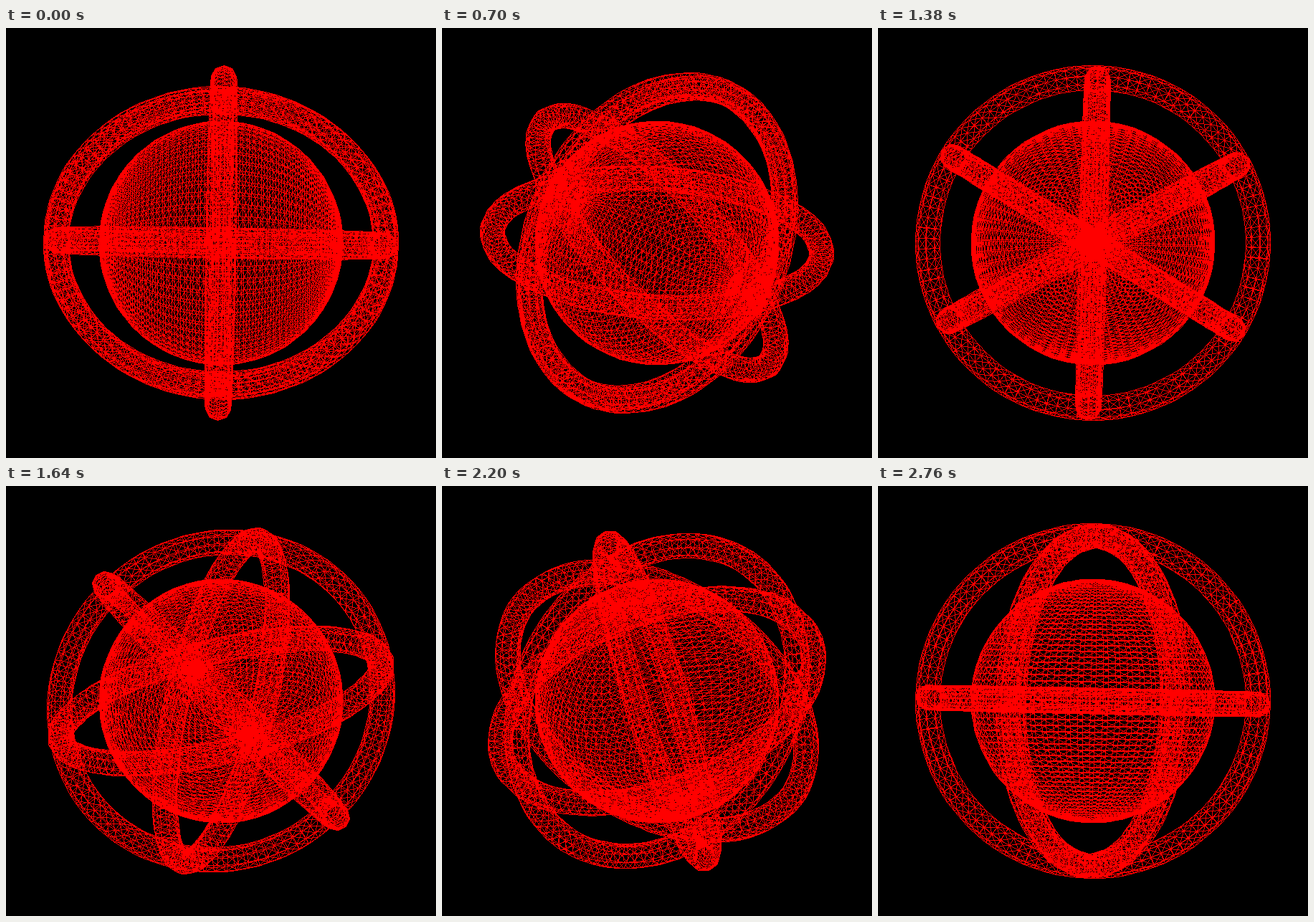
An HTML page with a canvas that plays this animation: 600 px wide and 600 px high, repeating every 2.78 s.

```html
<!DOCTYPE html>
<html lang="en">
<head>
<meta charset="utf-8">
<title>Wireframe sphere with rings</title>
<style>
  html, body { margin: 0; width: 100%; height: 100%; overflow: hidden; background: #000; }
  canvas { display: block; width: 600px; height: 600px; image-rendering: pixelated; }
</style>
</head>
<body>
<canvas id="stage" width="600" height="600"></canvas>
<script>
const SIZE = 600, CENTER = 300;
const FRAME_MS = 20, FRAMES = 139;
const SPHERE_RADIUS = 170, RING_RADIUS = 230, TUBE_RADIUS = 17.5;
const SPHERE_STEPS = 60, RING_STEPS = 100, TUBE_STEPS = 9;
const DEG = Math.PI / 180, TAU = 2 * Math.PI;
const RED = 0xff0000ff, BLACK = 0xff000000;

const ctx = document.getElementById('stage').getContext('2d');
const image = ctx.createImageData(SIZE, SIZE);
const pixels = new Uint32Array(image.data.buffer);

// A mesh is a (rows + 1) x (cols + 1) lattice of points.
function mesh(rows, cols, pointAt) {
  const points = [];
  for (let i = 0; i <= rows; i++)
    for (let j = 0; j <= cols; j++) points.push(pointAt(i / rows, j / cols));
  return { rows, cols, points, xs: new Int16Array(points.length), ys: new Int16Array(points.length) };
}

// The poles lie on the x axis.
const sphere = mesh(SPHERE_STEPS, SPHERE_STEPS, (u, v) => {
  const lat = u * Math.PI, lon = v * TAU, r = SPHERE_RADIUS * Math.sin(lat);
  return [SPHERE_RADIUS * Math.cos(lat), r * Math.cos(lon), r * Math.sin(lon)];
});

// orient maps (in-plane a, in-plane b, along the ring's axis) to body space.
function ring(orient) {
  return mesh(RING_STEPS, TUBE_STEPS, (u, v) => {
    const r = RING_RADIUS + TUBE_RADIUS * Math.cos(v * TAU);
    return orient(r * Math.cos(u * TAU), r * Math.sin(u * TAU), TUBE_RADIUS * Math.sin(v * TAU));
  });
}

function meridian(angle) {
  const c = Math.cos(angle * DEG), s = Math.sin(angle * DEG);
  return ring((a, b, n) => [a, n * c - b * s, n * s + b * c]);
}

const equator = ring((a, b, n) => [n, a, b]);
const meshes = [sphere, equator, meridian(0), meridian(60), meridian(120)];

const multiply = (a, b) =>
  a.map(row => [0, 1, 2].map(j => row[0] * b[0][j] + row[1] * b[1][j] + row[2] * b[2][j]));

// Each frame adds one degree about every axis.
const c = Math.cos(DEG), s = Math.sin(DEG);
const turnX = [[1, 0, 0], [0, c, s], [0, -s, c]];
const turnY = [[c, 0, s], [0, 1, 0], [-s, 0, c]];
const turnZ = [[c, -s, 0], [s, c, 0], [0, 0, 1]];
const step = multiply(turnZ, multiply(turnY, turnX));
const poses = [step];
while (poses.length < FRAMES) poses.push(multiply(step, poses[poses.length - 1]));

function line(x, y, x1, y1) {
  const dx = Math.abs(x1 - x), dy = -Math.abs(y1 - y);
  const sx = x < x1 ? 1 : -1, sy = y < y1 ? 1 : -1;
  let err = dx + dy;
  for (;;) {
    pixels[y * SIZE + x] = RED;
    if (x === x1 && y === y1) return;
    const e = 2 * err;
    if (e >= dy) { err += dy; x += sx; }
    if (e <= dx) { err += dx; y += sy; }
  }
}

function drawMesh({ rows, cols, points, xs, ys }, [rx, ry]) {
  points.forEach(([x, y, z], k) => {
    xs[k] = Math.floor(CENTER + rx[0] * x + rx[1] * y + rx[2] * z);
    ys[k] = Math.floor(CENTER + ry[0] * x + ry[1] * y + ry[2] * z);
  });
  const edge = (a, b) => line(xs[a], ys[a], xs[b], ys[b]);
  const stride = cols + 1;
  for (let i = 0; i < rows; i++) {
    for (let j = 0; j < cols; j++) {
      const k = i * stride + j;
      edge(k, k + 1);
      edge(k, k + stride);
      edge(k, k + stride + 1);
    }
  }
}

let shown = -1;
function render(time) {
  const frame = Math.floor(time / FRAME_MS) % FRAMES;
  if (frame === shown) return;
  shown = frame;
  pixels.fill(BLACK);
  for (const m of meshes) drawMesh(m, poses[frame]);
  ctx.putImageData(image, 0, 0);
}

const start = performance.now();
function tick() {
  render(performance.now() - start);
  requestAnimationFrame(tick);
}
tick();
</script>
</body>
</html>
```
